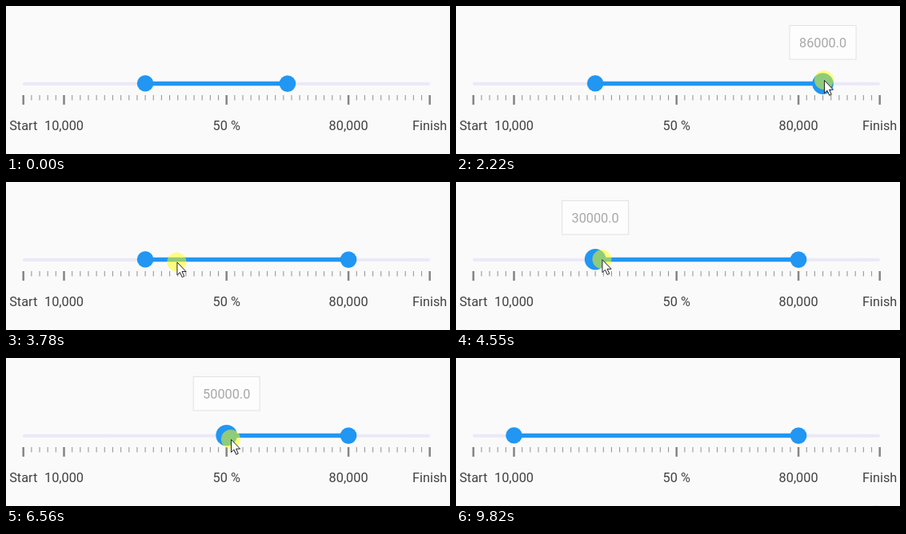
Animation of 555 by 186 pixels, one loop 9.97 s. Source, as an HTML page:

```html
<!DOCTYPE html>
<html lang="en">
<head>
<meta charset="utf-8">
<title>Range slider</title>
<style>
  html, body { margin: 0; width: 100%; height: 100%; overflow: hidden; background: #fafafa; }
  svg { display: block; width: 555px; height: 186px; }
  text { font: 16.3px Roboto, Arial, sans-serif; text-anchor: middle; fill: #424242; }
  #tip text { fill: #a8a8a8; }
</style>
</head>
<body>
<svg viewBox="0 0 555 186">
  <path d="M23 97.7H528" stroke="#ebe8f7" stroke-width="4" stroke-linecap="round"/>
  <g id="scale"></g>
  <path id="range" stroke="#2196f3" stroke-width="5.4"/>
  <circle id="low" cy="97.2" fill="#2196f3"/>
  <circle id="high" cy="97.6" fill="#2196f3"/>
  <g id="tip">
    <rect x="-41.5" y="-42.5" width="83" height="42.5" fill="#fdfdfd" stroke="#e2e2e2"/>
    <text y="-15.5"></text>
  </g>
  <g id="cursor">
    <circle r="12" fill="#ff0" fill-opacity=".5"/>
    <path d="M.5 .5V16.5L4 13.2 6.8 19.3 9.3 18.1 6.6 12.2H11.6Z" fill="#fff" stroke="#222"/>
  </g>
</svg>
<script>
const LOOP = 9970;
const SWITCH = 4000; // the drag passes from the high thumb to the low one
const el = id => document.getElementById(id);
const xOf = value => 21.7 + value * 5.08;
const mix = (a, b, u) => a + (b - a) * u;
const smooth = u => u * u * (3 - 2 * u);

// start ms, end ms, steps, then the pose reached: value, cursor x, y, press; last an optional late bias
const moves = [
  [440, 820, 6, 65, 358, 104, 0],
  [1450, 2220, 11, 86, 460, 93, 1, 1.9],
  [2390, 2770, 6, 80, 424, 95, 1],
  [3250, 3940, 10, 80, 189, 101, 0],
  [SWITCH, SWITCH, 1, 30, 189, 101, 0],
  [4090, 4320, 4, 30, 180, 97, 1],
  [4470, 5170, 10, 51, 288, 102, 1, 1.5],
  [5470, 5710, 4, 49, 277, 102, 1],
  [6410, 6560, 3, 50, 281, 102, 1],
  [7490, 7880, 6, 19, 97, 104, 1],
  [7957, 8030, 2, 10, 72, 104, 1],
  [8810, 9120, 5, 10, 352, 199, 0],
  [9820, 9820, 1, 10, 525, 197, 0]
];
const poses = [[65, 462, 192, 0], ...moves.map(m => m.slice(3, 7))];

function poseAt(t) {
  const i = moves.findLastIndex(m => t >= m[0]);
  if (i < 0) return [65, 462, 220, 0];
  const [start, end, count] = moves[i], bias = moves[i][7] || 1;
  const pace = (end - start) / (count - 1) || 1;
  const step = Math.min(count, 1 + Math.floor((t - start) / pace + .15));
  const u = smooth((step / count) ** bias);
  const from = poses[i], to = poses[i + 1];
  const pose = from.map((v, j) => mix(v, to[j], u));
  pose[3] = mix(from[3], to[3], Math.min(1, step / 2));
  return pose;
}

const labels = { 0: "Start", 10: "10,000", 50: "50 %", 80: "80,000", 100: "Finish" };
let marks = "";
for (let v = 0; v <= 100; v += 2) {
  const x = xOf(v), label = labels[v];
  marks += `<path d="M${x} 112V${label ? 124 : 118.5}" stroke="${label ? "#858585" : "#999"}" stroke-width="${label ? 2.5 : 1.1}"/>`;
  if (label) marks += `<text x="${x}" y="156">${label}</text>`;
}
el("scale").innerHTML = marks;

function thumb(id, value, press) {
  el(id).setAttribute("cx", xOf(value));
  el(id).setAttribute("r", mix(10.3, 13.3, press));
}

function draw(t) {
  const [raw, x, y, press] = poseAt(t);
  const value = Math.round(raw);
  const upper = t < SWITCH;
  const low = upper ? 30 : value, high = upper ? value : 80;
  thumb("low", low, upper ? 0 : press);
  thumb("high", high, upper ? press : 0);
  el("range").setAttribute("d", `M${xOf(low)} 97.5H${xOf(high)}`);
  el("tip").setAttribute("transform", `translate(${xOf(value)} ${upper ? 67 : 66}) scale(${press})`);
  el("tip").lastElementChild.textContent = (value * 1000).toFixed(1);
  el("cursor").setAttribute("transform", `translate(${x} ${y})`);
}

const origin = performance.now();
function tick() {
  draw((performance.now() - origin) % LOOP);
  requestAnimationFrame(tick);
}
tick();
</script>
</body>
</html>
```
